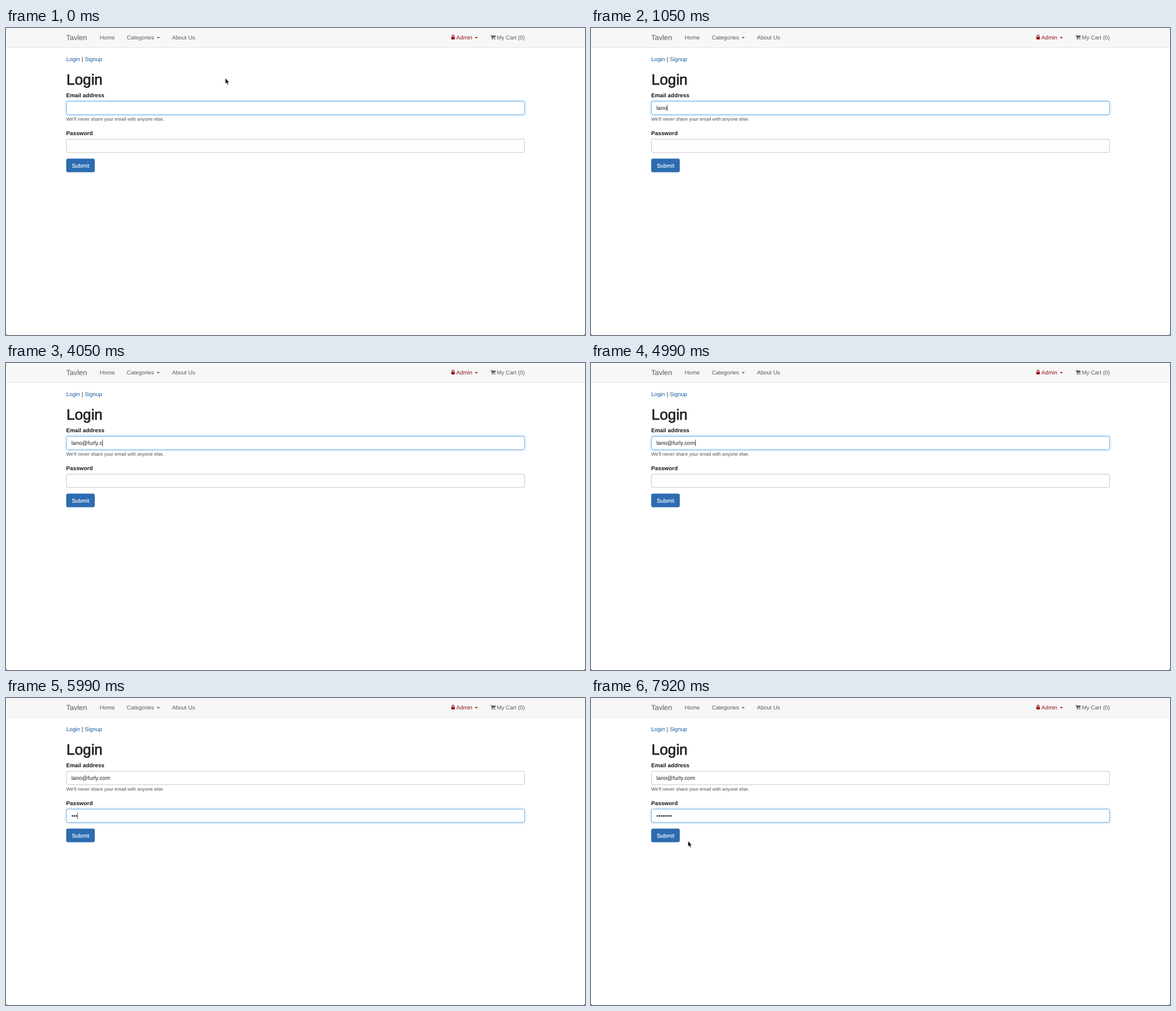
These frames come from a looping animation (962 px wide and 510 px high, 7990 ms). An HTML page:

```html
<!DOCTYPE html>
<html lang="en">
<head>
<meta charset="utf-8">
<title>Login</title>
<style>
  html, body { margin: 0; height: 100%; overflow: hidden; background: #fff; }
  svg { display: block; width: 962px; height: 510px; }
  text { font: 9.36px "Liberation Sans", Arial, sans-serif; fill: #222; text-rendering: geometricPrecision; white-space: pre; }
  .nav text { fill: #5c5c5c; }
  .nav .brand { font-size: 12.03px; }
  .nav .admin { fill: #941a1e; }
  .link { fill: #145ba3; }
  .title { font-size: 24.5px; stroke: #222; stroke-width: .75px; }
  .label { font-weight: bold; fill: #161616; }
  .help { font-size: 7.93px; fill: #505050; }
  .field { fill: #fff; stroke: #bababa; stroke-width: .8px; }
  .focus { fill: #fff; stroke: #66afe9; stroke-width: .8px; filter: drop-shadow(0 0 2px rgba(102, 175, 233, .6)); }
</style>
</head>
<body>
<svg viewBox="0 0 962 510">
  <defs>
    <rect id="box" x="100.4" y=".4" width="761.2" height="22" rx="2.7"/>
    <path id="down" d="M0 0h5.2L2.6 2.7z"/>
  </defs>

  <g class="nav">
    <rect width="962" height="32.5" fill="#f7f7f7"/>
    <rect y="32.2" width="962" height=".8" fill="#e2e2e2"/>
    <text class="brand" x="100" y="19.7">Tavlen</text>
    <text x="155.8" y="18.9">Home</text>
    <text x="200.8" y="18.9">Categories</text>
    <use href="#down" x="250.4" y="14.9" fill="#5c5c5c"/>
    <text x="275.7" y="18.9">About Us</text>
    <g fill="#941a1e">
      <rect x="739.9" y="14.7" width="5.8" height="4.2" rx=".6"/>
      <path d="M741.1 15v-1.4a1.7 1.7 0 0 1 3.4 0V15" fill="none" stroke="#941a1e" stroke-width="1.1"/>
      <use href="#down" x="778.9" y="14.9"/>
    </g>
    <text class="admin" x="748.3" y="18.9">Admin</text>
    <g fill="#5c5c5c">
      <path d="M806.4 12.4h6.9v3.2l-5.9 1z"/>
      <path d="M804.8 12.1h1.6l1.1 5.3h5.3" fill="none" stroke="#5c5c5c" stroke-width=".8"/>
      <circle cx="808" cy="18.6" r=".8"/>
      <circle cx="812.2" cy="18.6" r=".8"/>
    </g>
    <text x="862.1" y="18.9" text-anchor="end">My Cart (0)</text>
  </g>

  <text class="link" x="100" y="55.4">Login</text>
  <text x="125.7" y="55.4">|</text>
  <text class="link" x="130.7" y="55.4">Signup</text>
  <text class="title" x="100.5" y="94.4">Login</text>

  <text class="label" x="100" y="115">Email address</text>
  <use href="#box" y="121.5" class="field"/>
  <use href="#box" y="121.5" class="focus" id="emailFocus"/>
  <text id="email" x="108.7" y="136.1"></text>
  <text class="help" x="100" y="154.2">We'll never share your email with anyone else.</text>

  <text class="label" x="100" y="177.6">Password</text>
  <use href="#box" y="184.3" class="field"/>
  <use href="#box" y="184.3" class="focus" id="passwordFocus"/>
  <text id="password" x="108.7" y="199.2"></text>
  <rect id="caret" width=".8" height="10.8" fill="#333"/>

  <rect x="100.3" y="217.2" width="46.9" height="22.1" rx="2.5" fill="#2c6cb0" stroke="#2865a6" stroke-width=".6"/>
  <text x="123.7" y="231.8" text-anchor="middle" style="fill:#fff;stroke:#fff;stroke-width:.15px">Submit</text>

  <path id="cursor" d="M0 0V9.6L2.2 7.5 3.7 11 5.3 10.3 3.8 7H6.6z" stroke="#fff" stroke-width=".6"/>
  <path d="M0 507.5Q0 510 2.5 510H0zM962 507.5Q962 510 959.5 510H962z"/>
</svg>
<script>
const DURATION = 7990, TAB_TIME = 5020, BLINK = 500;
const MOVE_START = 7600, MOVE_END = 7920;
const ADDRESS = 'lano@furly.com';
const emailKeys = [50, 250, 450, 720, 1300, 2120, 2590, 2850, 3050, 3350, 3650, 4050, 4300, 4590];
const passwordKeys = [5390, 5590, 5850, 6080, 6310, 6650, 6850, 7190];

const get = id => document.getElementById(id);
const [email, password, emailFocus, passwordFocus, caret, cursor] =
  ['email', 'password', 'emailFocus', 'passwordFocus', 'caret', 'cursor'].map(get);
const clamp = v => Math.min(1, Math.max(0, v));
const typed = (keys, t) => keys.filter(k => k <= t).length;

function draw(t) {
  email.textContent = ADDRESS.slice(0, typed(emailKeys, t));
  password.textContent = '•'.repeat(typed(passwordKeys, t));

  const focus = 1 - (1 - clamp((t - TAB_TIME) / 150)) ** 3;
  emailFocus.style.opacity = 1 - focus;
  passwordFocus.style.opacity = focus;

  // The caret blinks from the latest key press.
  const onPassword = t >= TAB_TIME;
  const field = onPassword ? password : email;
  const lastKey = Math.max(-BLINK, ...[...emailKeys, TAB_TIME, ...passwordKeys].filter(k => k <= t));
  const length = field.textContent ? field.getComputedTextLength() : 0;
  caret.setAttribute('x', 108.7 + length);
  caret.setAttribute('y', onPassword ? 190.2 : 127.4);
  caret.style.opacity = Math.floor((t - lastKey) / BLINK) % 2 ? 0 : 1;

  // Typing hides the pointer until the mouse moves again.
  const p = 1 - (1 - clamp((t - MOVE_START) / (MOVE_END - MOVE_START))) ** 2;
  cursor.setAttribute('transform', `translate(${364.4 - 203.2 * p} ${83.3 + 154.3 * p})`);
  cursor.style.opacity = t < emailKeys[0] || t >= MOVE_START ? 1 : 0;
}

const start = performance.now();
function tick() {
  draw((performance.now() - start) % DURATION);
  requestAnimationFrame(tick);
}
tick();
</script>
</body>
</html>
```
